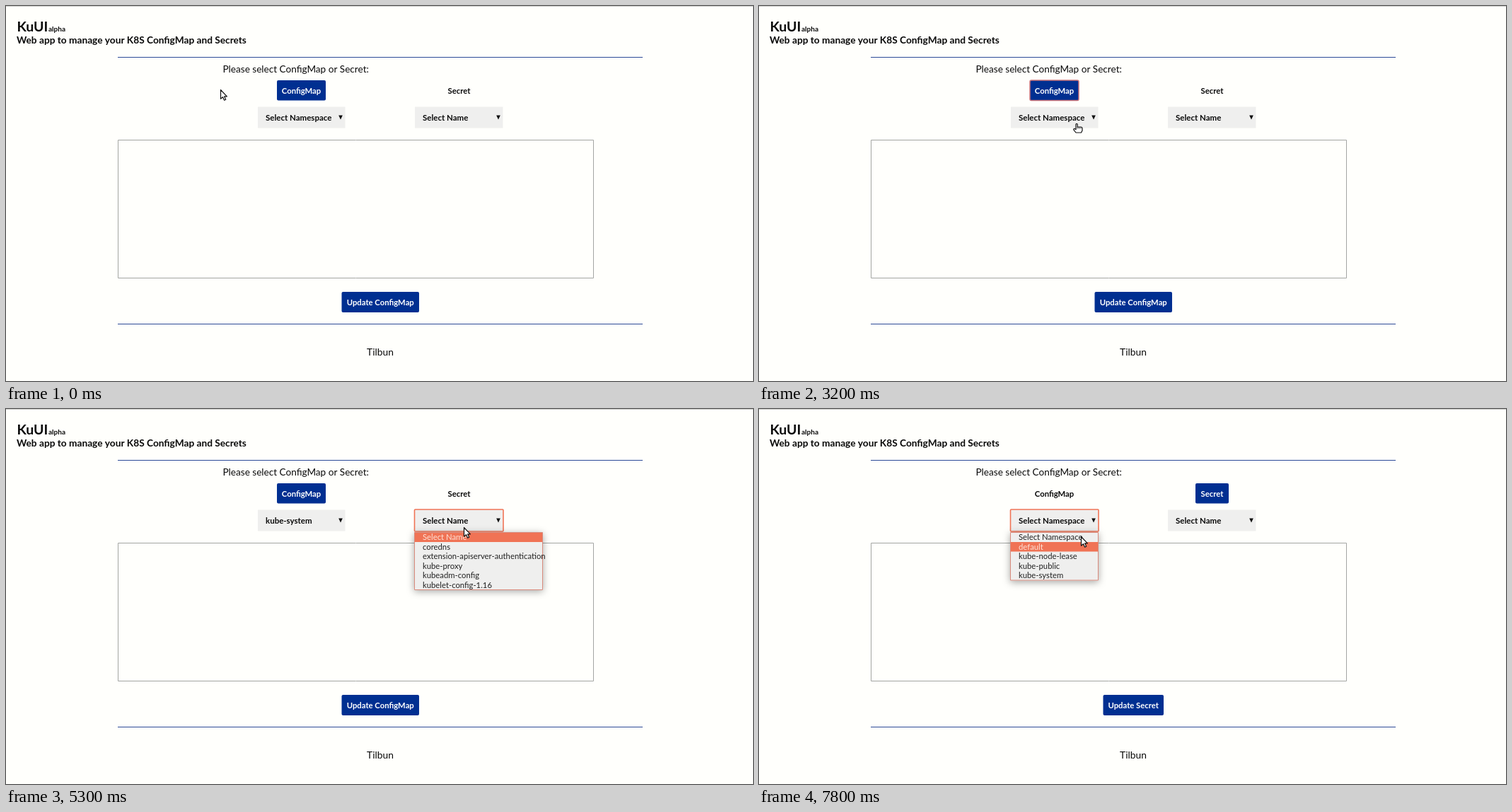
Animation, 1056 px wide and 530 px high, one loop 8 s. Source, as an HTML page with a canvas:

```html
<!DOCTYPE html>
<html lang="en">
<head>
<meta charset="utf-8">
<title>KuUI</title>
<style>
  html, body { margin: 0; width: 100%; height: 100%; overflow: hidden; background: #fffffc; }
  canvas { display: block; }
</style>
</head>
<body>
<canvas id="stage" width="1056" height="530"></canvas>
<script>
const ctx = document.getElementById('stage').getContext('2d');
const LOOP = 8000, STEP = 100;
const BLUE = '#002f91', GREY = '#efefee', INK = '#0a0a0a', ACCENT = '#f07355', RING = '#f0a090';
const ROW = 13.5, LIST_TOP = 174;

// Pointer hot spot: time, x, y
const pointerPath = [
  [0, 303, 118], [300, 303, 118], [500, 351, 126], [600, 351, 126], [1200, 634, 114],
  [1700, 634, 114], [2400, 428, 120], [2800, 428, 120], [3200, 449, 166], [3400, 449, 166],
  [3800, 446, 231], [4100, 446, 231], [4400, 603, 160], [4500, 603, 160], [4800, 695, 166],
  [5200, 695, 166], [5300, 647, 167], [5500, 647, 167], [5900, 497, 108], [6000, 497, 108],
  [6400, 640, 124], [6600, 642, 121], [6900, 642, 121], [7000, 529, 138], [7100, 529, 138],
  [7200, 486, 142], [7300, 486, 142], [7500, 460, 160], [7700, 457, 192], [7800, 455, 180],
  [8000, 455, 180]
];

// Focused control from each time on
const focusTimes = [
  [0, ''], [1500, 'secret'], [2500, 'config'], [3500, 'space'],
  [4600, 'name'], [6700, 'secret'], [7500, 'space']
];

const controls = {
  config: { x: 383, y: 105, w: 69, h: 28.5 },
  secret: { x: 617, y: 105, w: 47, h: 28.5 },
  space: { x: 356, y: 142.5, w: 123.5, h: 30, listWidth: 125,
    items: ['Select Namespace', 'default', 'kube-node-lease', 'kube-public', 'kube-system'] },
  name: { x: 578, y: 142.5, w: 124.5, h: 30, listWidth: 182,
    items: ['Select Name', 'coredns', 'extension-apiserver-authentication', 'kube-proxy',
      'kubeadm-config', 'kubelet-config-1.16'] }
};

const within = (t, from, to) => t >= from && t < to;

function pointerAt(t) {
  const i = Math.max(1, pointerPath.findIndex(key => key[0] >= t));
  const [t0, x0, y0] = pointerPath[i - 1], [t1, x1, y1] = pointerPath[i];
  const k = (t - t0) / (t1 - t0);
  return { x: Math.round(x0 + (x1 - x0) * k), y: Math.round(y0 + (y1 - y0) * k) };
}

function text(str, x, y, size, weight = 400, color = INK, align = 'left') {
  ctx.font = `${weight} ${size}px Lato, sans-serif`;
  ctx.fillStyle = color;
  ctx.textAlign = align;
  ctx.fillText(str, x, y);
}

function fill(x, y, w, h, color, radius = 0) {
  ctx.fillStyle = color;
  ctx.beginPath();
  ctx.roundRect(x, y, w, h, radius);
  ctx.fill();
}

function outline(x, y, w, h, color, width = 1, radius = 0) {
  ctx.strokeStyle = color;
  ctx.lineWidth = width;
  ctx.beginPath();
  ctx.roundRect(x, y, w, h, radius);
  ctx.stroke();
}

function button({ x, y, w, h }, label, active, focused) {
  if (active) fill(x, y, w, h, BLUE, 2);
  if (focused) outline(x, y, w, h, '#c9737a', 1.5, 2);
  text(label, x + w / 2, y + 18.5, 11.3, 700, active ? '#fff' : INK, 'center');
}

function select({ x, y, w, h }, label, focused, open) {
  fill(x, y, w, h, GREY);
  if (focused) outline(x - .5, y - .5, w + 1, h + 1, open ? ACCENT : RING, 1.6, 1);
  text(label, x + 11, y + 19, 11.5, 700);
  const ax = x + w - 6.5, ay = y + 12;
  ctx.beginPath();
  ctx.moveTo(ax - 2.8, ay);
  ctx.lineTo(ax + 2.8, ay);
  ctx.lineTo(ax, ay + 6);
  ctx.fill();
}

function list({ x, items, listWidth }, hoverY) {
  const left = x - 1, height = items.length * ROW + 1;
  const hovered = Math.min(items.length - 1, Math.max(0, Math.floor((hoverY - LIST_TOP) / ROW)));
  ctx.save();
  ctx.shadowColor = 'rgba(0,0,0,.35)';
  ctx.shadowBlur = 10;
  ctx.shadowOffsetY = 2;
  fill(left, LIST_TOP, listWidth, height, GREY);
  ctx.restore();
  fill(left, LIST_TOP + hovered * ROW + .5, listWidth, ROW, ACCENT);
  outline(left + .5, LIST_TOP + .5, listWidth - 1, height - 1, '#d98a7c');
  items.forEach((item, i) =>
    text(item, x + 11, LIST_TOP + 11 + i * ROW, 11.3, 400, i === hovered ? '#fde3d8' : '#222'));
}

const arrowShape = new Path2D('M.5 .5V13.2L3.4 10.6L5.6 15.2L7.7 14.2L5.6 9.8H9.4Z');
const handShape = new Path2D('M-1 1Q0-.5 1.2 1V5H6Q8 5 8 7V10L6.5 13H-1L-4.2 8.8Q-4.4 7 -2.8 7.4L-1 8.6Z');

function pointer({ x, y }, hand) {
  const shape = hand ? handShape : arrowShape;
  ctx.save();
  ctx.translate(x, y);
  ctx.fillStyle = '#fff';
  ctx.strokeStyle = '#111';
  ctx.lineWidth = 1.2;
  ctx.lineJoin = 'round';
  ctx.fill(shape);
  ctx.stroke(shape);
  if (hand) {
    ctx.lineWidth = .8;
    ctx.stroke(new Path2D('M1.2 5V7.5M3.5 5V7.5M5.8 5V7.5'));
  }
  ctx.restore();
}

function page() {
  fill(0, 0, 1056, 530, '#fffffc');
  fill(0, 0, 1056, 1, '#cfcfcc');
  text('KuUI', 15.5, 36, 19.5, 700);
  text('alpha', 60, 36, 10, 700);
  text('Web app to manage your K8S ConfigMap and Secrets', 15, 53, 13.7, 700);
  text('Please select ConfigMap or Secret:', 306.5, 94, 13.6);
  fill(158, 72, 742, 1, '#2c4a97');
  fill(158, 449, 742, 1, '#2c4a97');
  outline(158.5, 189.5, 672, 195, '#a3a5a3');
  text('Tilbun', 529, 494, 13.8, 400, INK, 'center');
}

function draw(now) {
  const t = Math.floor(now % LOOP / STEP) * STEP;
  const cursor = pointerAt(t);
  const focus = focusTimes.findLast(([start]) => t >= start)[1];
  const secret = within(t, 1500, 2500) || t >= 6700;
  const spaceOpen = within(t, 3500, 4200) || t >= 7500;
  const nameOpen = within(t, 4700, 5900);
  const { config, secret: secretBox, space, name } = controls;

  page();
  button(config, 'ConfigMap', !secret, focus === 'config');
  button(secretBox, 'Secret', secret, focus === 'secret');
  select(space, within(t, 4200, 6700) ? 'kube-system' : 'Select Namespace', focus === 'space', spaceOpen);
  select(name, 'Select Name', focus === 'name', nameOpen);
  const w = secret ? 85.5 : 109.5;
  button({ x: 529.25 - w / 2, y: 404, w, h: 29 }, secret ? 'Update Secret' : 'Update ConfigMap', true);

  // The hovered row trails the pointer by one step
  const hoverY = pointerAt(Math.max(0, t - STEP)).y;
  if (spaceOpen) list(space, hoverY);
  if (nameOpen) list(name, hoverY);

  const overControl = Object.values(controls).some(({ x, y, w, h }) =>
    within(cursor.x, x, x + w) && within(cursor.y, y, y + h));
  pointer(cursor, overControl && !spaceOpen && !nameOpen);
}

function tick() {
  draw(performance.now());
  requestAnimationFrame(tick);
}
tick();
</script>
</body>
</html>
```
